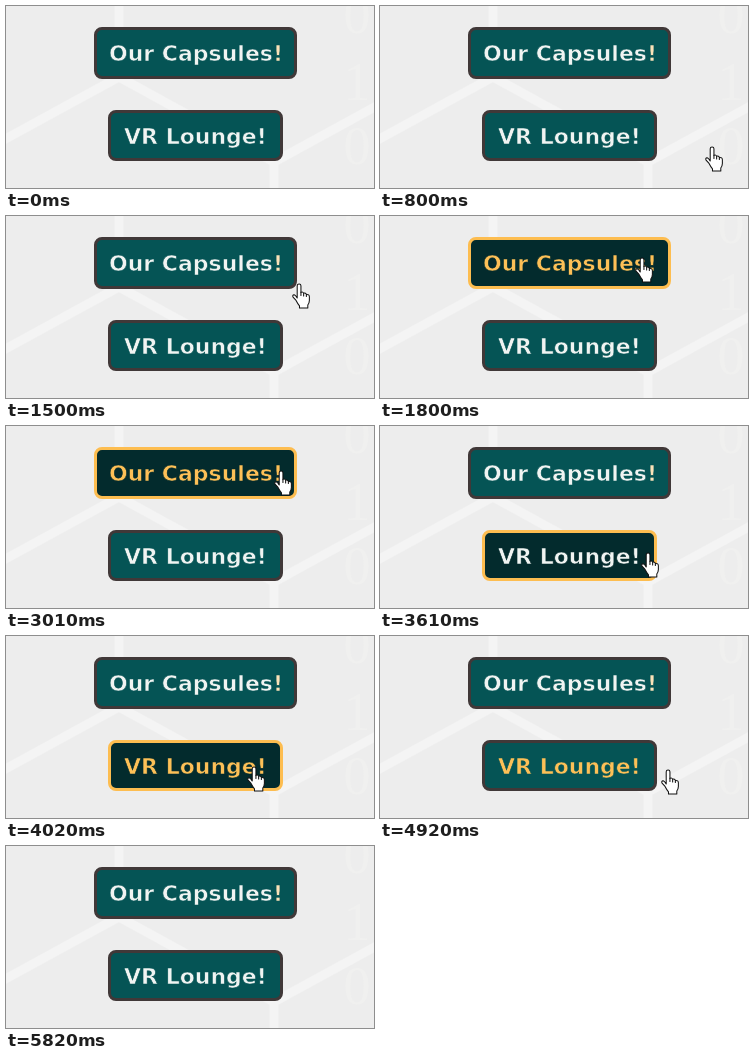
An HTML page that plays this animation: 368 by 182 pixels, repeating every 6.43 s.

```html
<!DOCTYPE html>
<html lang="en">
<head>
<meta charset="utf-8">
<title>Button hover</title>
<style>
  html, body { margin: 0; width: 100%; height: 100%; overflow: hidden; background: #ededed; }
  svg { display: block; width: 368px; height: 182px; }
  .lattice { fill: none; stroke: #f4f4f4; stroke-width: 9; }
  .digits { font: 54px "Liberation Serif", serif; fill: #f0f0ef; text-anchor: middle; }
  .button { --face: #055455; --edge: #403838; --ink: #f0f4f2; --mark: #fae2b8; }
  .lit { --face: #032b2d; --edge: #fdbd50; }
  .gold { --ink: #fdc057; --mark: #fdc057; }
  .box { fill: var(--face); stroke: var(--edge); stroke-width: 3; }
  /* the face-coloured outline slims the bold letters */
  .label { font: bold 22px "DejaVu Sans", sans-serif; fill: var(--ink); stroke: var(--face); stroke-width: .6; }
  .mark { fill: var(--mark); }
</style>
</head>
<body>
<svg viewBox="0 0 368 182">
  <g class="digits">
    <text x="351" y="27">0</text>
    <text x="351" y="94">1</text>
    <text x="351" y="158">0</text>
  </g>
  <path class="lattice" d="M-6 136L113 71L268 156L374 98M113 71V-5M268 156V190"/>
  <g class="button">
    <rect class="box" x="89.5" y="22.5" width="200" height="49" rx="6.5"/>
    <text class="label" x="103" y="55">Our Capsules<tspan class="mark">!</tspan></text>
  </g>
  <g class="button">
    <rect class="box" x="103.5" y="105.5" width="172" height="48" rx="6.5"/>
    <text class="label" x="118" y="138">VR Lounge!</text>
  </g>
  <g id="hand" stroke="#111" stroke-linejoin="round" stroke-linecap="round">
    <path fill="#fff" d="M5 14.5V2.7a1.8 1.8 0 0 1 3.6 0V9q1.8-.9 2.6.9 2-.7 2.6 1.1 2.9-.3 2.9 2.2v3.6q0 2.2-1.5 4.4v2.8H7.2v-2q-1.7-2-3.3-5.2L1 13.6q-.9-2 1-2.3 1.2 0 3 3.2z"/>
    <path fill="none" d="M8.6 9V12M11.2 10V12.5M13.8 11V13"/>
  </g>
</svg>
<script>
  const LOOP = 6430, STEP = 100;
  const TIP = { x: 6, y: 1 };

  // Where the pointer turns or rests: time, left, top
  const stops = [
    [500, 331, 184], [900, 324, 134], [1300, 324, 134],
    [1500, 286, 67], [1800, 255, 41], [2400, 255, 41],
    [3000, 268, 44], [3300, 320, 113], [3800, 241, 130],
    [4700, 241, 130], [5300, 329, 137], [5500, 329, 137], [5800, 347, 184]
  ];

  const hand = document.getElementById("hand");
  const buttons = [...document.querySelectorAll(".button")].map(el => ({
    el, area: el.querySelector(".box").getBBox()
  }));
  const easeOut = p => 1 - (1 - p) ** 1.5;

  function pointer(t) {
    const next = stops.findIndex(s => s[0] > t);
    const [t0, x0, y0] = stops.at(Math.max(next, 0) - 1);
    if (next < 1) return { x: x0, y: y0 };
    const [t1, x1, y1] = stops[next];
    const p = easeOut((t - t0) / (t1 - t0));
    return { x: Math.round(x0 + (x1 - x0) * p), y: Math.round(y0 + (y1 - y0) * p) };
  }

  function hovers(area, t) {
    const at = pointer(t);
    const dx = at.x + TIP.x - area.x, dy = at.y + TIP.y - area.y;
    return dx >= 0 && dx <= area.width && dy >= 0 && dy <= area.height;
  }

  function draw(time) {
    const t = Math.floor((time + 10) / STEP) * STEP;
    const at = pointer(t);
    hand.setAttribute("transform", `translate(${at.x} ${at.y}) scale(1.04)`);
    for (const { el, area } of buttons) {
      el.classList.toggle("lit", hovers(area, t));
      el.classList.toggle("gold", hovers(area, t - STEP)); // label lags one step
    }
  }

  const start = performance.now();
  function tick() {
    draw((performance.now() - start) % LOOP);
    requestAnimationFrame(tick);
  }
  tick();
</script>
</body>
</html>
```
